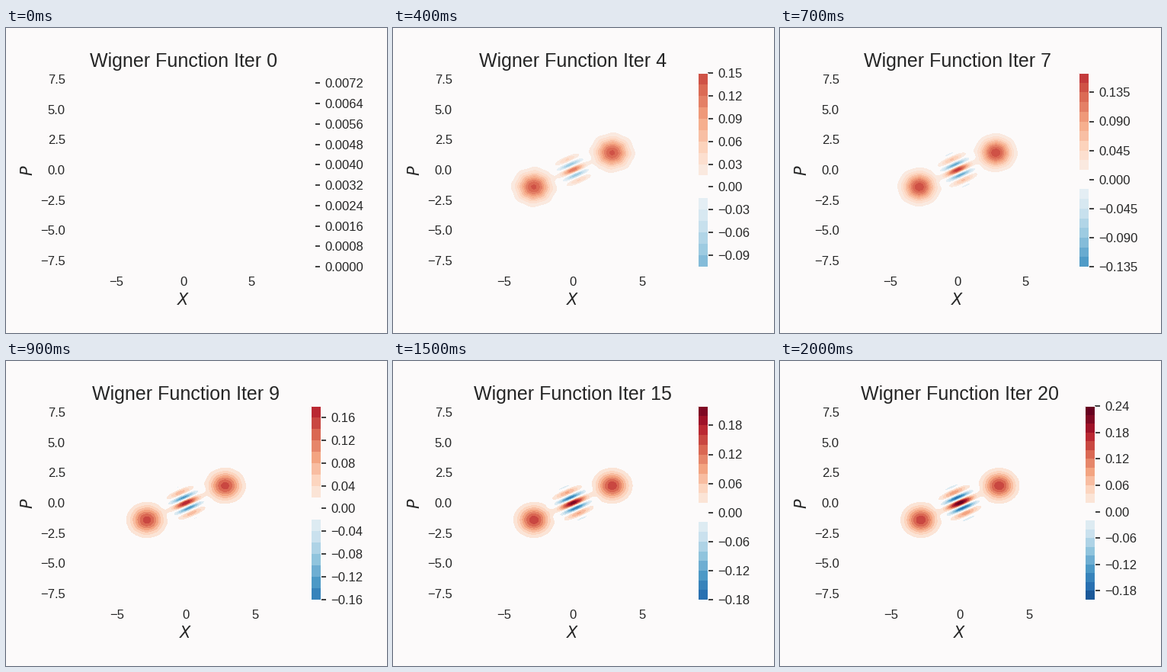
A matplotlib script that plays this animation: 500 by 400 pixels, repeating every 2.1 s.

```python
import numpy as np
import matplotlib.pyplot as plt
from matplotlib.animation import FuncAnimation
from matplotlib.colors import ListedColormap, to_rgba

W, H, DPI = 500, 400, 100
BG, INK = "#fcfafa", "#262626"
LIM, VMAX = 8, 0.225
FRAMES, INTERVAL = 21, 100
TOP, HEIGHT, LEFT = 59, 254, 91
BAR_WIDTH = 12.7

plt.rcParams.update({
    "font.family": "Liberation Sans",
    "font.size": 12,
    "text.color": INK,
    "xtick.color": INK,
    "ytick.color": INK,
})

axis = np.linspace(-LIM, LIM, 321)
X, P = np.meshgrid(axis, axis)
X0, P0 = 2 * np.sqrt(2), np.sqrt(2)


def diverging_map():
    """RdBu_r whose near-zero band melts into the background."""
    t = np.linspace(-1, 1, 512)
    colors = plt.get_cmap("RdBu_r")((t + 1) / 2)
    colors[np.abs(t) < 0.062] = to_rgba(BG)
    return ListedColormap(colors)


CMAP = diverging_map()


def lobe(n, sign):
    """One coherent blob that sharpens as the iterations go on."""
    dx, dp = X - sign * X0, P - sign * P0
    width = 1 + 0.6 / n
    ripple = 0.05 * np.exp((4 - n) / 4) * np.cos(8 * np.arctan2(dp, dx) + 0.6)
    r2 = dx**2 + dp**2
    return np.exp(-r2 / (width * (1 + ripple))) / (2 * np.pi * width)


def fringes(n):
    """Interference stripes that gain contrast and length."""
    size = np.hypot(X0, P0)
    along = (X * X0 + P * P0) / size
    across = (P * X0 - X * P0) / size
    contrast = np.interp(n, [0, 4, 7, 9, 12, 15, 20],
                         [0, 0.118, 0.159, 0.1785, 0.193, 0.21, 0.232])
    envelope = np.exp(-(1 + 1.5 / n) * along**2 - across**2)
    return contrast * envelope * np.cos(2 * size * across)


def wigner(n):
    if n == 0:
        return 0.0075 * np.exp(-(X**2 + P**2) / 40)
    return lobe(n, 1) + lobe(n, -1) + fringes(n)


def box(left, width):
    """Pixel column to figure fractions."""
    return [left / W, 1 - (TOP + HEIGHT) / H, width / W, HEIGHT / H]


def style_axes(ax):
    ax.set_facecolor(BG)
    ax.spines[:].set_visible(False)
    ax.set(xlim=(-LIM, LIM), ylim=(-LIM, LIM),
           xticks=[-5, 0, 5], yticks=np.arange(-7.5, 8, 2.5))
    ax.tick_params(length=0, pad=9.5, labelsize=12)


def update(n):
    fig.clear()
    ax = fig.add_axes(box(LEFT, 290.5))
    cax = fig.add_axes(box(400.2, BAR_WIDTH))
    cf = ax.contourf(X, P, wigner(n), 20, cmap=CMAP, vmin=-VMAX, vmax=VMAX)
    style_axes(ax)

    bar = fig.colorbar(cf, cax=cax)
    bar.minorticks_off()
    bar.outline.set(edgecolor=BG, linewidth=0.75)
    cax.tick_params(length=5, width=1.25, pad=4.5, labelsize=12)

    # Long bar labels squeeze the plot to the left.
    labels = bar.formatter.format_ticks(bar.get_ticks())
    center = 235.5
    if max(map(len, labels)) > 5:
        center = 232.6
        ax.set_position(box(LEFT, 284))
        cax.set_position(box(392.2, BAR_WIDTH))

    ax.set_title(f"Wigner Function Iter {n}", fontsize=18, pad=6)
    fig.text(center / W, 1 - 363 / H, "$X$", fontsize=15,
             ha="center", va="baseline")
    fig.text(39 / W, 1 - 187 / H, "$P$", fontsize=15, rotation=90,
             ha="right", va="center")
    return []


fig = plt.figure(figsize=(W / DPI, H / DPI), dpi=DPI, facecolor=BG)
anim = FuncAnimation(fig, update, frames=FRAMES, init_func=lambda: [],
                     interval=INTERVAL, repeat=True, repeat_delay=0)
plt.show()
```
